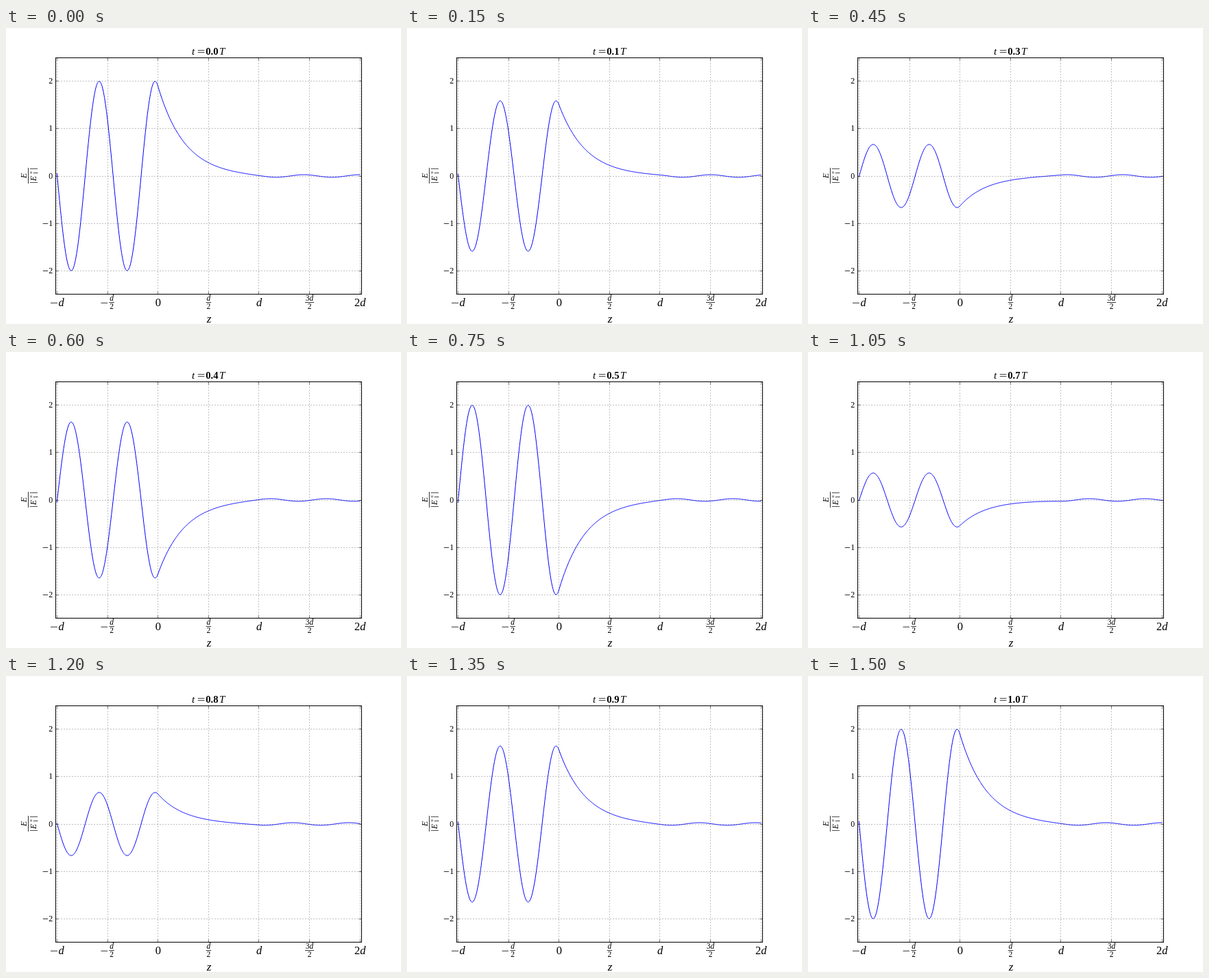
Recreate the animation shown at these times as an HTML page. Size 576 px wide and 432 px high, loop 1.65 s.

```html
<!DOCTYPE html>
<html lang="en">
<head>
<meta charset="utf-8">
<title>Wave across a gap</title>
<style>
  html, body { margin: 0; width: 100%; height: 100%; overflow: hidden; background: #fff; }
  svg { display: block; width: 576px; height: 432px; }
  text { font-family: "Liberation Serif", "Times New Roman", serif; }
  .i { font-style: italic; }
  .b { font-weight: bold; }
</style>
</head>
<body>
<svg id="plot" viewBox="0 0 576 432">
  <path id="wave" fill="none" stroke="#00f" stroke-linecap="square" stroke-linejoin="round"/>
</svg>
<script>
(() => {
const svg = document.getElementById('plot');
const wave = document.getElementById('wave');

function add(tag, attrs, parent = svg) {
  const el = document.createElementNS('http://www.w3.org/2000/svg', tag);
  for (const key in attrs) el.setAttribute(key, attrs[key]);
  return parent.appendChild(el);
}
function label(str, x, y, size, cls = '', anchor = 'middle', parent = svg) {
  const el = add('text', { x, y, 'font-size': size, class: cls, 'text-anchor': anchor }, parent);
  el.textContent = str;
  return el;
}
const line = (d, width = 0.8, dash = 'none', opacity = 1, parent = svg) =>
  add('path', { d, fill: 'none', stroke: '#000', 'stroke-width': width,
    'stroke-dasharray': dash, 'stroke-opacity': opacity }, parent);

// Axes, grid and ticks
const left = 72.5, right = 518.5, top = 43.5, bottom = 388.5;
const cols = [74.5, 148.5, 221.5, 295.5, 368.5, 442.5, 516.5];
const rows = [77.5, 146.5, 216.5, 285.5, 354.5];
for (const x of cols) {
  line(`M${x} ${bottom}V${top}`, 1, '1 3', 0.5);
  line(`M${x} ${bottom}v-4M${x} ${top}v4`, 1, 'none', 0.5);
}
rows.forEach((y, i) => {
  line(`M${left} ${y}H${right}`, 1, '1 3', 0.5);
  line(`M${left} ${y}h4M${right} ${y}h-4`, 1, 'none', 0.5);
  label(Math.abs(2 - i), 68.3, y + 3.7, 12, '', 'end');
  if (i > 2) line(`M53.8 ${y}h7.4`);
});
add('rect', { x: left, y: top, width: right - left, height: bottom - top, fill: 'none', stroke: '#000' });

// Labels along z
function fraction(num, x, width) {
  line(`M${x - width / 2} 400.5h${width}`);
  const el = label('', x, 398, 11.5);
  for (const ch of num) add('tspan', { class: ch === 'd' ? 'i' : '' }, el).textContent = ch;
  label('2', x, 409.5, 11.5);
}
line('M65 401.3h10');
label('d', 80.6, 405.5, 16.5, 'i');
line('M138.5 401.3h9.5');
fraction('d', 154.2, 7.5);
label('0', 221.8, 405.5, 16.5);
fraction('d', 295.4, 7.5);
label('d', 369, 405.5, 16.5, 'i');
fraction('3d', 442.5, 13);
label('2', 512, 405.5, 16.5);
label('d', 520.4, 405.5, 16.5, 'i');
label('z', 296, 429.5, 17, 'i');

// Vertical axis title
const side = add('g', { transform: 'translate(32.5 215.5) rotate(-90)' });
line('M-11.5 0h23', 0.8, 'none', 1, side);
label('E', 0, -2.5, 12, 'i', 'middle', side);
line('M-10 2.5v11M10 2.5v11', 0.7, 'none', 1, side);
label('E', -4, 11, 12, 'i', 'middle', side);
label('+', 4.6, 6.5, 9, '', 'middle', side);
label('1', 4, 13, 8, '', 'middle', side);

// Title
label('t', 271, 38.5, 15, 'i', 'start');
line('M279.8 32.7h9.6M279.8 35.7h9.6');
const clock = label('', 300.4, 38.5, 14.6, 'b');
label('T', 311, 38.5, 15, 'i', 'start');

// Tunnelling wave: standing for z < 0, evanescent in the gap, travelling for z > d (d = 1)
const k = 11.343, ratio = 3, kappa = k / ratio;
const amp = 1 / Math.hypot(1, (ratio + 1 / ratio) / 2 * Math.sinh(kappa));

function field(z, turn) {
  const phase = -k - turn, c = Math.cos(phase), s = ratio * Math.sin(phase);
  if (z > 1) return amp * Math.cos(k * (z - 1) + phase);
  const depth = kappa * (Math.max(z, 0) - 1);
  const ch = Math.cosh(depth), sh = Math.sinh(depth);
  const e = c * ch - s * sh;
  if (z >= 0) return amp * e;
  const slope = (c * sh - s * ch) / ratio;
  return amp * (e * Math.cos(k * z) + slope * Math.sin(k * z));
}

let shown = -1;
function draw(now) {
  const step = Math.floor(now / 150) % 11;
  if (step === shown) return;
  shown = step;
  clock.textContent = (step / 10).toFixed(1);
  const pts = [];
  for (let i = 0; i <= 600; i++) {
    const z = -1 + i / 200;
    const x = 221.6 + 147.25 * z;
    const y = 216 - 69.12 * field(z, step * Math.PI / 5);
    pts.push(x.toFixed(2) + ' ' + y.toFixed(2));
  }
  wave.setAttribute('d', 'M' + pts.join('L'));
}
const start = performance.now();
function tick() {
  draw(performance.now() - start);
  requestAnimationFrame(tick);
}
tick();
})();
</script>
</body>
</html>
```
